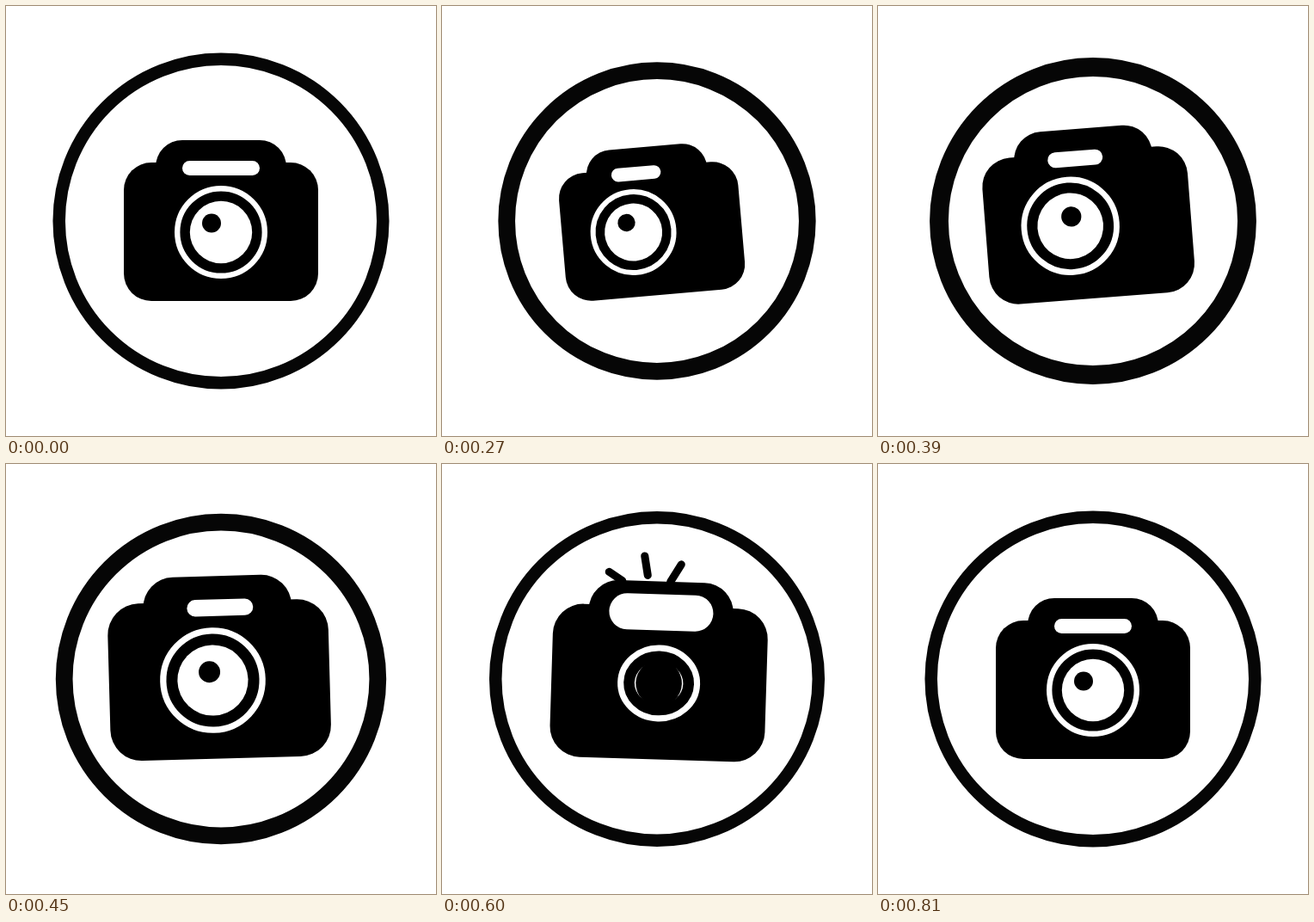
An HTML page with a canvas that plays this animation: 500 by 500 pixels, repeating every 960 ms.

```html
<!DOCTYPE html>
<html lang="en">
<head>
<meta charset="utf-8">
<title>Camera icon</title>
<style>
  html, body { margin: 0; width: 100%; height: 100%; overflow: hidden; background: #fff; }
  canvas { display: block; width: 500px; height: 500px; }
</style>
</head>
<body>
<canvas id="stage" width="500" height="500"></canvas>
<script>
const ctx = document.getElementById('stage').getContext('2d');
const LOOP = 960, STEP = 30;

// Turning points in ms
const START = 150, DIP = 270, SWING = 318, AIM = 510, SNAP = 600, END = 810;

const lerp = (a, b, k) => a + (b - a) * k;
const clamp = k => Math.min(1, Math.max(0, k));
const smooth = k => k * k * (3 - 2 * k);
const progress = (t, a, b) => clamp((t - a) / (b - a));

// Eases through time, value pairs and holds the ends.
function track(t, ...pairs) {
  let v = pairs[1];
  for (let i = 2; i < pairs.length; i += 2) {
    v = lerp(v, pairs[i + 1], smooth(progress(t, pairs[i - 2], pairs[i])));
  }
  return v;
}

function box(cx, cy, w, h, r, color) {
  ctx.fillStyle = color;
  ctx.beginPath();
  ctx.roundRect(cx - w / 2, cy - h / 2, w, h, r);
  ctx.fill();
}

function oval(x, y, rx, ry = rx) {
  ctx.beginPath();
  ctx.ellipse(x, y, rx, ry, 0, 0, Math.PI * 2);
}

function drawRing(t) {
  const squeeze = smooth(progress(t, START, DIP));
  const release = smooth(1 - (1 - progress(t, DIP, 690)) ** 1.38);
  ctx.strokeStyle = '#060606';
  ctx.lineWidth = track(t, START, 14.5, 348, 22.4, 610, 14.5);
  oval(250, 250, 188.3 - 13.5 * (squeeze - release));
  ctx.stroke();
}

// Each ray shoots out from behind the hump, then its tail catches up.
function drawRays(t) {
  if (t <= 540 || t >= 690) return;
  const fade = progress(t, SNAP, 690);
  const tip = lerp(-1, 1, progress(t, 540, SNAP)) + 0.4 * fade;
  const tail = lerp(-1, 0, progress(t, 570, SNAP)) + 1.4 * fade;
  const ray = (ax, ay, bx, by) => {
    ctx.beginPath();
    ctx.moveTo(lerp(ax, bx, tail), lerp(ay, by, tail));
    ctx.lineTo(lerp(ax, bx, tip), lerp(ay, by, tip));
    ctx.stroke();
  };
  ctx.strokeStyle = '#000';
  ctx.lineWidth = 8.2;
  ctx.lineCap = 'round';
  ray(-41.6, -106, -55.9, -115);
  ray(-15.1, -112.6, -18.9, -132.8);
  ray(9, -106.6, 19.8, -125);
}

function drawBody(t) {
  box(0, -66.5, 152, 80, 31, '#000');
  box(0, 0, 226, 161, 32, '#000');

  const x = track(t, START, 0, SWING, -17, AIM, 8.6, 610, 0);
  const w = track(t, START, 90, SWING, 55.5, AIM, 71.5, SNAP, 109.5, END, 90);
  const h = track(t, AIM, 17, SNAP, 38, END, 17);
  box(x, -74.1, w, h, h / 2, '#fff');
}

function drawLens(t) {
  const x = track(t, START, 0, SWING, -29, AIM, 0);
  const shutX = track(t, 465, 0, SNAP, 10.6, END, 0);
  const shutY = track(t, 450, 0, SNAP, 13.8, END, 0);
  const pupilX = track(t, 210, -11, 390, 1.8, AIM, -8.2, SNAP, 0, END, -11);
  const pupilY = track(t, START, -10.5, DIP, -12.6, AIM, -7.9, SNAP, 0, END, -10.5);

  ctx.translate(x, 0.5 + 0.06 * x);
  ctx.strokeStyle = ctx.fillStyle = '#fff';
  ctx.lineWidth = 6.4;
  oval(0, 0, 50.8 - shutX, 50.8 - shutY);
  ctx.stroke();
  oval(0, 0, 36.2 - shutX, 36.2 - shutY);
  ctx.fill();
  ctx.fillStyle = '#000';
  oval(pupilX, pupilY, 11 + 1.25 * shutX);
  ctx.fill();
}

function draw(t) {
  ctx.setTransform(1, 0, 0, 1, 0, 0);
  ctx.fillStyle = '#fff';
  ctx.fillRect(0, 0, 500, 500);
  drawRing(t);

  const angle = track(t, START, 0, SWING, -6.15, 560, 1.9, END, 0);
  const scale = track(t, START, 1, DIP, 0.925, 483, 1.15, END, 1);
  const y = track(t, START, 262.5, DIP, 262, 475, 250.7, END, 262.5);
  ctx.translate(250 + 1.2 * angle, y);
  ctx.rotate(angle * Math.PI / 180);
  ctx.scale(scale, scale);
  drawRays(t);
  drawBody(t);
  drawLens(t);
}

const start = performance.now();
function tick() {
  const t = (performance.now() - start) % LOOP;
  draw(Math.floor(t / STEP) * STEP);
  requestAnimationFrame(tick);
}
tick();
</script>
</body>
</html>
```
